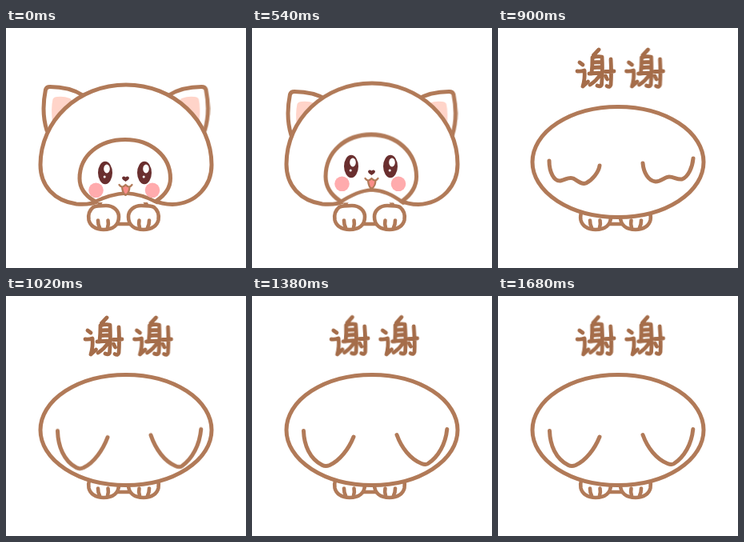
An HTML page for the animation above (1860 ms loop, 300 by 300 pixels).

```html
<!DOCTYPE html>
<html lang="zh">
<head>
<meta charset="utf-8">
<title>谢谢</title>
<style>
html, body { margin: 0; width: 100%; height: 100%; overflow: hidden; background: #fff; }
svg { display: block; width: 100vw; height: 100vh; }
.line { fill: none; stroke: #b17a58; stroke-width: 5; stroke-linecap: round; stroke-linejoin: round; }
.line path, .line ellipse { vector-effect: non-scaling-stroke; }
.white { fill: #fff; }
.inner { fill: #ffd4c9; stroke: none; }
.blush { fill: #ffabad; stroke: none; }
.tongue { fill: #f98d88; stroke: none; }
.dark { fill: #6a2f2f; stroke: none; }
.shine { fill: #fff; stroke: none; }
.thin { stroke-width: 2.2; }
.paws { stroke-width: 4.6; }
.word { stroke: #a56d4a; stroke-width: 4.8; }

.up, .dip, .bow, .perk, .wave, .droop, .word, .head, .ear, .face, .features, .chin, .glyph {
  animation: 1860ms step-end infinite;
}
.up { animation-name: up; }
.dip { animation-name: dip; }
.bow { animation-name: bow; }
.perk { animation-name: perk; transform-origin: 0 167px; }
.wave { animation-name: wave; }
.droop { animation-name: droop; transform-origin: 0 168px; }
.word { animation-name: word; }
.head { animation-name: head; transform-origin: 0 220px; }
.ear { animation-name: ear; }
.face { animation-name: face; transform-origin: 0 214px; }
.features { animation-name: features; }
.chin { animation-name: chin; transform-origin: 0 217px; }
.glyph { animation-name: wobble; transform-origin: 122px 50px; }

@keyframes up { 0% { visibility: visible } 38.71%, 100% { visibility: hidden } }
@keyframes dip { 0% { visibility: hidden } 38.71% { visibility: visible } 41.935%, 100% { visibility: hidden } }
@keyframes bow { 0% { visibility: hidden } 41.935%, 100% { visibility: visible } }
@keyframes perk {
  0% { visibility: hidden; transform: none }
  41.935% { visibility: visible; transform: none }
  45.161% { visibility: visible; transform: scaleY(.4) }
  48.387%, 100% { visibility: hidden }
}
@keyframes wave { 0% { visibility: hidden } 48.387% { visibility: visible } 51.613%, 100% { visibility: hidden } }
@keyframes droop {
  0% { visibility: hidden; transform: none }
  51.613% { visibility: visible; transform: scaleY(.85) }
  54.839% { visibility: visible; transform: scaleY(1.07) }
  58.065% { visibility: visible; transform: scaleY(.96) }
  61.29%, 100% { visibility: visible; transform: none }
}
@keyframes word { 0% { visibility: hidden } 48.387%, 100% { visibility: visible } }

@keyframes head { 0% { transform: none } 25.806%, 100% { transform: scaleY(1.013) } }
@keyframes ear { 0% { transform: none } 25.806% { transform: translate(-1.5px, 4px) } 29.032%, 100% { transform: translate(-2px, 6px) } }
@keyframes face { 0% { transform: none } 25.806% { transform: scaleY(1.06) } 29.032%, 100% { transform: scaleY(1.085) } }
@keyframes features { 0% { transform: none } 25.806% { transform: translateY(-6px) } 29.032%, 100% { transform: translateY(-8px) } }
@keyframes chin { 0% { transform: none } 25.806% { transform: scaleY(1.3) } 29.032%, 100% { transform: scaleY(1.4) } }
@keyframes wobble {
  0% { transform: none }
  67.742% { transform: translateY(-.2px) rotate(-.8deg) }
  74.194% { transform: translateY(-.5px) rotate(-1.6deg) }
  77.419% { transform: translateY(-.2px) rotate(-.8deg) }
  83.871% { transform: none }
  90.323%, 100% { transform: translateY(-.5px) rotate(-1.6deg) }
}
</style>
</head>
<body>
<svg viewBox="0 0 300 300">
  <defs>
    <g id="ear">
      <path class="white" d="M51 128C46 112 46.500 92 49.500 77Q50.500 73.500 55 73.500C70 73.500 84 76.500 96 84"/>
      <path class="inner" d="M58 118Q56 100 58.500 89Q60 86 64 86Q72 85 80 88Q85 91 80 98Z"/>
    </g>
    <g id="eye">
      <ellipse class="dark" cy="181" rx="9" ry="14.3"/>
      <ellipse class="shine" cx="2" cy="176" rx="3.8" ry="5.4"/>
      <circle class="shine" cx="-.8" cy="186" r="1.5"/>
    </g>
    <g id="mouth">
      <path class="dark" d="M149.500 192C147 190.500 145 189 145 187Q147 184.500 149.500 186.500Q152 184.500 154 187C154 189 152 190.500 149.500 192Z"/>
      <path class="tongue" d="M145 198.500Q150 195 154.500 198.500Q154 207 149.500 209Q146 206 145 198.500Z"/>
      <path class="thin" d="M141.500 196Q145 201 149.500 196Q154 201 157.500 196M145 199Q146 207 149.500 209Q154 206 154.500 199"/>
    </g>
    <g id="features">
      <circle class="blush" cx="112.500" cy="202.800" r="9.300"/>
      <circle class="blush" cx="183" cy="202.800" r="9.300"/>
      <use href="#eye" x="124"/>
      <use href="#eye" x="173"/>
      <use href="#mouth"/>
    </g>
    <path id="muzzle" class="white" d="M110 216C97 208 92 199 92 188C92 159 117 139.500 149 139.500C181 139.500 205.500 160 205.500 188C205.500 199 200 208 188 216"/>
    <g id="perk">
      <path d="M63 168C64 150 72 130 85 122Q89 120 94 123C108 130 118 142 125 155"/>
      <path class="inner" d="M76 162C78 150 82 140 89 138C96 137 105 145 111 153Q113 157 108 157C98 158 88 160 80 163Q75 165 76 162Z"/>
      <path d="M180 156C187 144 198 131 213 124Q218 121 222 124C235 133 241 150 242 168"/>
      <path class="inner" d="M194 160C196 152 207 141 214 139C221 139 227 150 229 163Q229 167 224 165C215 162 206 162 197 162.500Q192 162 194 160Z"/>
    </g>
    <g id="xie">
      <path d="M102 43L106 46M99 54Q104 54.500 108 53Q109 63 106 73L112.500 67"/>
      <path d="M126 27L119.500 34M118 37Q118 47 117 57M118 37Q124 35 130 36Q131 55 129.500 71Q128 74 124 72M119 43L128 42.500M119 49.500L128 49M114 57L129 56M128 58Q123 66 115 71"/>
      <path d="M134 54.500L145 54M141 39Q142 57 141 71Q140 75 136 72.500M134.500 60L136.500 64"/>
    </g>
    <clipPath id="dipClip"><ellipse cx="150" cy="160" rx="107" ry="76"/></clipPath>
  </defs>

  <g class="line paws">
    <path d="M139 245H157"/>
    <g id="paw">
      <path class="white" d="M109 224C104 228 102.500 234 103.500 240C105 247 112 252 122 252C134 252 141 246 141 236C141 228 134 222 125 222C118 222 112 222 109 224Z"/>
      <path d="M115 240.500Q115 246 117 249.500M127.500 240.500Q128.500 245 127 249.500"/>
    </g>
    <use href="#paw" transform="matrix(-1 0 0 1 294 0)"/>
  </g>

  <g class="line up">
    <g class="ear"><use href="#ear"/></g>
    <g transform="matrix(-1 0 0 1 299.500 0)"><g class="ear"><use href="#ear"/></g></g>
    <path class="white head" d="M117 216C108 220 98 221 88 220C60 216 43 197 43 171C43 116 90 71 150 71C210 71 257 116 257 171C257 197 238 219.500 208 220.500C200 220.500 192 219 183 215"/>
    <g class="face"><use href="#muzzle"/></g>
    <path d="M121 213L116.500 221M171 213L176 221" stroke-width="4.500"/>
    <path class="white chin" d="M109 218C124 211 136 207 149.500 206.500C163 207 174 210 189 218" stroke-width="4.500"/>
    <g class="features"><use href="#features"/></g>
  </g>

  <g class="line dip">
    <ellipse class="white" cx="150" cy="160" rx="107" ry="76"/>
    <g clip-path="url(#dipClip)">
      <g transform="translate(0 20)">
        <use href="#muzzle"/>
        <use href="#features"/>
      </g>
    </g>
    <ellipse cx="150" cy="160" rx="107" ry="76"/>
    <use href="#perk" transform="translate(0 -24)"/>
  </g>

  <g class="line bow">
    <ellipse class="white" cx="150" cy="167.500" rx="107" ry="69"/>
  </g>
  <g class="line perk"><use href="#perk"/></g>
  <g class="line wave">
    <path d="M64 166C64 180 70 192 78 191C86 189 88 186 94 188C100 191 104 196 110 194C118 190 126 180 127 172"/>
    <path d="M181 169C182 181 188 191 197 192C205 192 208 186 214 186C220 186 224 190 230 189C238 186 243 174 244 163"/>
  </g>
  <g class="line droop">
    <path d="M64.500 168.500C65 186 72 203.500 88 211.500Q92 213.500 97 211.500C110 205.500 121 191 127 176"/>
    <path d="M181 173.500C187 190 198 204 212 209.500Q217 211.500 220 209.500C233 201 242 185 243.800 166.500"/>
  </g>

  <g class="line word" role="img" aria-label="谢谢">
    <g class="glyph"><use href="#xie"/></g>
    <g transform="translate(61.500 0)"><g class="glyph"><use href="#xie"/></g></g>
  </g>
</svg>
</body>
</html>
```
